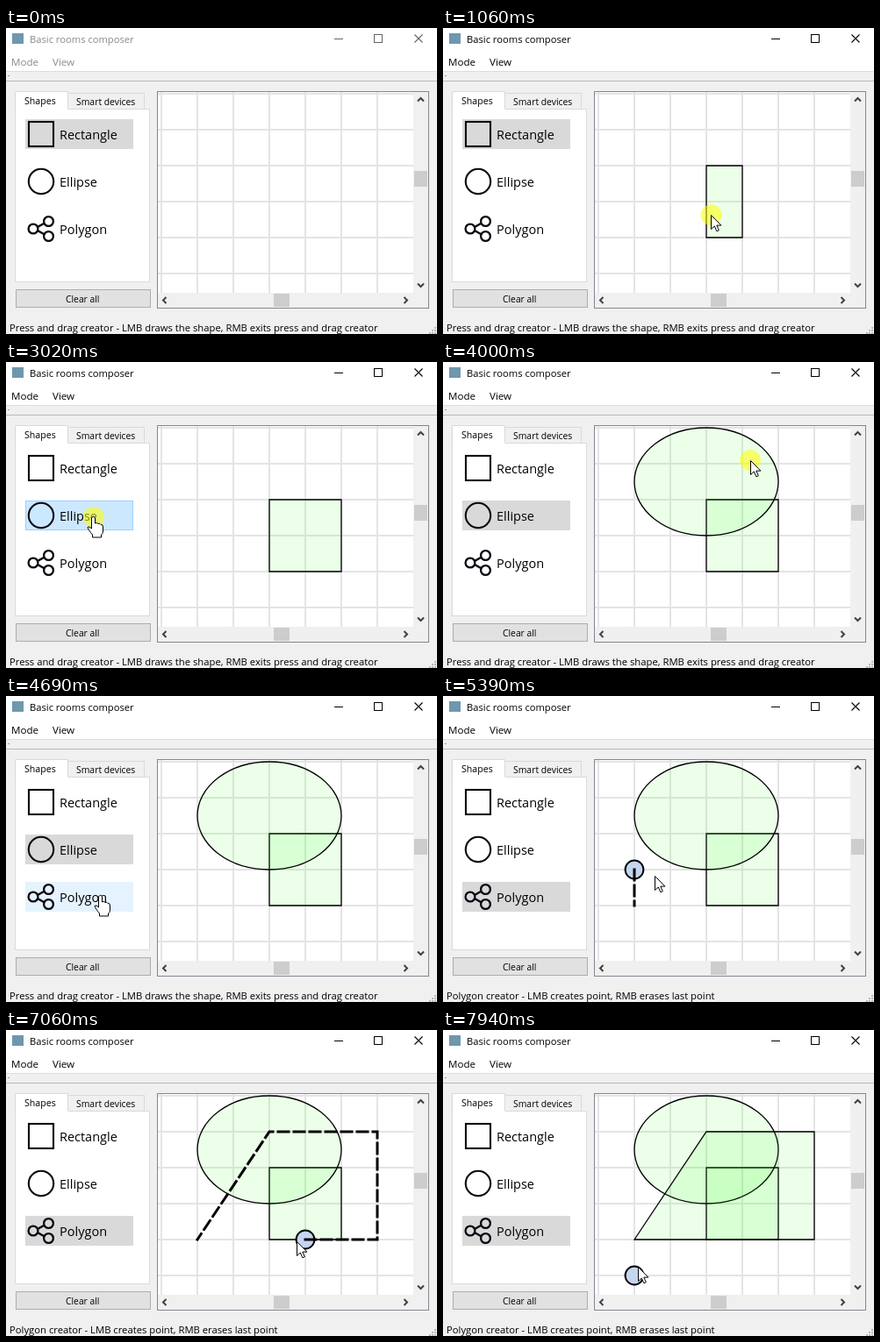
Recreate the animation shown at these times as an HTML page with a canvas. Size 491x349 px, loop 7.99 s.

```html
<!DOCTYPE html>
<html lang="en">
<head>
<meta charset="utf-8">
<title>Basic rooms composer</title>
<style>
html, body { margin: 0; width: 100%; height: 100%; overflow: hidden; background: #f0f0f0; }
canvas { display: block; width: 491px; height: 349px; }
</style>
</head>
<body>
<canvas id="stage"></canvas>
<script>
const W = 491, H = 349, LOOP = 7990;
const canvas = document.getElementById('stage');
const c = canvas.getContext('2d');
const dpr = window.devicePixelRatio || 1;
canvas.width = W * dpr;
canvas.height = H * dpr;

// Scene grid
const STEP = 41, GX = 177, GY = 75;
const gx = i => GX + i * STEP;
const gy = i => GY + i * STEP;

// Pointer rests: arrive, leave, x, y, bend of the way there
const STOPS = [
  [130, 130, 302, 326],
  [700, 880, 326, 178],
  [1650, 1650, 316, 138],
  [1810, 1810, 357, 151],
  [2120, 2200, 358, 220],
  [2950, 3080, 100, 177, 22],
  [3340, 3440, 235, 189],
  [4000, 4270, 350, 112],
  [4700, 4820, 104, 230],
  [5060, 5240, 214, 239],
  [5750, 5940, 314, 117],
  [6330, 6430, 422, 133, -20],
  [6740, 6860, 422, 242],
  [7300, 7810, 220, 239],
  [7940, LOOP, 222, 270]
];

// Mouse button: down, up
const RECT = [780, 2160], ELLIPSE = [3340, 4270];
const PICK_ELLIPSE = [2950, 3080], PICK_POLY = [4720, 4820];
const CORNERS = [5060, 5750, 6330, 6740], CLOSE = [7300, 7530];
const PRESSES = [RECT, ELLIPSE, PICK_ELLIPSE, PICK_POLY, CLOSE,
  ...CORNERS.map(k => [k, k + 180])];
const CLOSED = 7570;

const ARROW = new Path2D('M0 0V16L3.8 12.5L6.4 18.3L8.8 17.2L6.3 11.6H11.4Z');
const HAND = new Path2D('M-3 0Q-1 -2.5 1 0V6.5Q3 5 4.5 7Q6.5 6 7.5 8Q10 7.5 10 10.5V15.5' +
  'Q10 18.5 8 19.5V22.5H-2V19.5Q-7 13.5 -7.5 11Q-6 9 -3 12.5Z');

const mix = (a, b, u) => a + (b - a) * u;
const ease = u => mix(u, u * u * (3 - 2 * u), .25);

function pointer(t) {
  const i = Math.max(0, STOPS.findLastIndex(s => t >= s[0]));
  const [, leave, x, y] = STOPS[i], next = STOPS[i + 1];
  if (t <= leave || !next) return [x, y];
  const u = (t - leave) / (next[0] - leave);
  if (i === 1) {
    const a = mix(.15, 5.33, u);
    return [300 + 27 * Math.cos(a), 172 + 42 * Math.sin(a)];
  }
  const e = ease(u), bend = (next[4] || 0) * Math.sin(Math.PI * u);
  return [mix(x, next[2], e), mix(y, next[3], e) + bend];
}

const gridPos = t => {
  const [x, y] = pointer(t);
  return [(x - GX) / STEP, (y - GY) / STEP];
};
const cellAt = t => gridPos(t).map(Math.floor);
const nodeAt = t => {
  const [i, j] = gridPos(t).map(Math.round);
  return [gx(i), gy(j)];
};

function fill(color, x, y, w, h) {
  c.fillStyle = color;
  c.fillRect(x, y, w, h);
}

function frame(color, x, y, w, h) {
  c.strokeStyle = color;
  c.lineWidth = 1;
  c.strokeRect(x + .5, y + .5, w - 1, h - 1);
}

function text(str, x, y, size, color = '#000') {
  c.font = size + 'px "Open Sans", "Noto Sans", sans-serif';
  c.fillStyle = color;
  c.fillText(str, x, y);
}

function line(color, width, ...pts) {
  c.strokeStyle = color;
  c.lineWidth = width;
  c.beginPath();
  pts.forEach(p => c.lineTo(p[0], p[1]));
  c.stroke();
}

function disc(x, y, r, stroke, width, color) {
  c.beginPath();
  c.arc(x, y, r, 0, 2 * Math.PI);
  if (color) { c.fillStyle = color; c.fill(); }
  if (stroke) { c.strokeStyle = stroke; c.lineWidth = width; c.stroke(); }
}

function chevron(x, y, dx, dy) {
  const side = s => [x - dx * 1.5 + s * dy * 3.5, y - dy * 1.5 + s * dx * 3.5];
  line('#404040', 2, side(1), [x + dx * 2, y + dy * 2], side(-1));
}

function drawWindow(t) {
  const active = t >= RECT[0];
  const ink = active ? '#000' : '#8a8a8a';
  const glyph = active ? '#000' : '#666';
  fill('#f0f0f0', 0, 0, W, H);
  fill('#fff', 0, 0, W, 49);
  fill('#6f97ae', 7, 6, 13, 12);
  text('Basic rooms composer', 27, 17, 11.2, ink);
  text('Mode', 6, 43, 11.6, ink);
  text('View', 53, 43, 11.6, ink);

  fill(glyph, 374, 12, 10, 1);
  frame(glyph, 419, 7, 10, 10);
  line(glyph, 1.1, [465.5, 7.5], [474.5, 16.5]);
  line(glyph, 1.1, [474.5, 7.5], [465.5, 16.5]);

  fill('#dcdcdc', 0, 49, W, 1);
  fill('#b8b8b8', 0, 60, W, 1);
  fill('#999', 2, 54, 2, 1);

  const status = t < PICK_POLY[0]
    ? 'Press and drag creator - LMB draws the shape, RMB exits press and drag creator'
    : 'Polygon creator - LMB creates point, RMB erases last point';
  text(status, 4, 346, 11.28);
  for (let r = 0; r < 3; r++)
    for (let k = 0; k <= r; k++) fill('#b8b8b8', 488 - k * 3, 341 + r * 3, 2, 2);
}

function drawIcon(i) {
  const ink = '#0a0610';
  if (i === 0) {
    c.strokeStyle = ink;
    c.lineWidth = 2.1;
    c.strokeRect(26, 107, 28, 28);
  } else if (i === 1) {
    disc(40, 175, 14.2, ink, 2.1);
  } else {
    line(ink, 2.4, [36, 227], [43, 223]);
    line(ink, 2.4, [36, 231], [43, 235]);
    disc(31, 229, 5.4, ink, 2.3);
    disc(48.5, 220.5, 5.4, ink, 2.3);
    disc(48.5, 237.5, 5.4, ink, 2.3);
  }
}

const rowTop = i => 104 + i * 54;
const rowAt = (x, y) => x < 22 || x > 145 ? -1
  : [0, 1, 2].findIndex(i => y >= rowTop(i) && y < rowTop(i) + 34);

function drawPanel(t) {
  fill('#fff', 10, 92, 154, 198);
  frame('#dadada', 10, 92, 154, 198);
  frame('#d9d9d9', 70, 74, 88, 19);
  fill('#fff', 10, 72, 61, 21);
  line('#d9d9d9', 1, [10.5, 94], [10.5, 72.5], [70.5, 72.5], [70.5, 92.5]);
  text('Shapes', 21, 87, 10.6);
  text('Smart devices', 80, 88, 10.4);

  const selected = t < PICK_ELLIPSE[0] ? 0 : t < PICK_POLY[0] ? 1 : 2;
  const hover = t >= STOPS[0][0] ? rowAt(...pointer(t)) : -1;
  const focused = (t >= PICK_ELLIPSE[0] && t < ELLIPSE[0]) ||
    (t >= PICK_POLY[0] && t < CORNERS[0]);
  ['Rectangle', 'Ellipse', 'Polygon'].forEach((name, i) => {
    const y = rowTop(i);
    if (i === selected) fill(focused ? '#cce8ff' : '#d9d9d9', 22, y, 123, 34);
    else if (i === hover) fill('#e5f3ff', 22, y, 123, 34);
    if (i === selected && i === hover) frame('#99d1ff', 22, y, 123, 34);
    drawIcon(i);
    text(name, 61, y + 23, 14.5);
  });

  fill('#e1e1e1', 11, 298, 154, 21);
  frame('#adadad', 11, 298, 154, 21);
  text('Clear all', 68, 313, 10.3);
}

function paint() {
  c.fillStyle = 'rgba(40,255,20,.09)';
  c.fill();
  c.strokeStyle = '#000';
  c.lineWidth = 1.3;
  c.stroke();
}

// Box spanning the cells under the pointer at press and now
function dragBox([start, end], t) {
  const a = cellAt(start), b = cellAt(Math.min(t, end));
  const [i, j] = [0, 1].map(k => Math.min(a[k], b[k]));
  const [w, h] = [0, 1].map(k => (Math.abs(a[k] - b[k]) + 1) * STEP);
  return [gx(i), gy(j), w, h];
}

function drawPolygon(t) {
  const pts = CORNERS.filter(k => t >= k).map(nodeAt);
  if (t >= CLOSED) {
    c.beginPath();
    pts.forEach(p => c.lineTo(...p));
    c.closePath();
    paint();
  }
  if (t < PICK_POLY[0] || pointer(t)[0] < 174) return;
  const node = nodeAt(t - 40);
  disc(...node, 10.4, '#000', 2, '#c6d5f0');
  if (pts.length && t < CLOSED) {
    c.setLineDash([12, 6]);
    c.lineCap = 'square';
    line('#000', 3, node, ...pts.reverse());
    c.setLineDash([]);
    c.lineCap = 'butt';
  }
}

function drawScene(t) {
  fill('#fff', 172, 72, 310, 248);
  c.save();
  c.beginPath();
  c.rect(173, 73, 291, 229);
  c.clip();
  for (let i = 0; i < 7; i++) fill('#e4e4e4', gx(i) - 1, 73, 2, 229);
  for (let i = 0; i < 6; i++) fill('#e4e4e4', 173, gy(i) - 1, 291, 2);

  if (t >= RECT[0]) {
    c.beginPath();
    c.rect(...dragBox(RECT, t));
    paint();
  }
  if (t >= ELLIPSE[0]) {
    const [x, y, w, h] = dragBox(ELLIPSE, t);
    c.beginPath();
    c.ellipse(x + w / 2, y + h / 2, w / 2, h / 2, 0, 0, 2 * Math.PI);
    paint();
  }
  drawPolygon(t);
  c.restore();

  fill('#f0f0f0', 464, 73, 17, 246);
  fill('#f0f0f0', 173, 302, 308, 17);
  fill('#cdcdcd', 465, 163, 15, 18);
  fill('#cdcdcd', 305, 303, 18, 15);
  chevron(472.5, 82, 0, -1);
  chevron(472.5, 293, 0, 1);
  chevron(181, 310.5, -1, 0);
  chevron(455, 310.5, 1, 0);
  frame('#828790', 172, 72, 310, 248);
}

function drawPointer(t) {
  if (t < STOPS[0][0]) return;
  const [x, y] = pointer(t);
  if (PRESSES.some(p => t >= p[0] && t < p[1])) disc(x, y, 12, null, 0, 'rgba(255,255,0,.55)');
  const shape = rowAt(x, y) >= 0 ? HAND : ARROW;
  c.save();
  c.translate(Math.round(x) + .5, Math.round(y) + .5);
  c.fillStyle = '#fff';
  c.fill(shape);
  c.strokeStyle = '#000';
  c.lineWidth = 1;
  c.stroke(shape);
  c.restore();
}

function draw(now) {
  const t = now % LOOP;
  c.setTransform(dpr, 0, 0, dpr, 0, 0);
  drawWindow(t);
  drawPanel(t);
  drawScene(t);
  drawPointer(t);
}

const begin = performance.now();
function tick() {
  draw(performance.now() - begin);
  requestAnimationFrame(tick);
}
tick();
</script>
</body>
</html>
```
